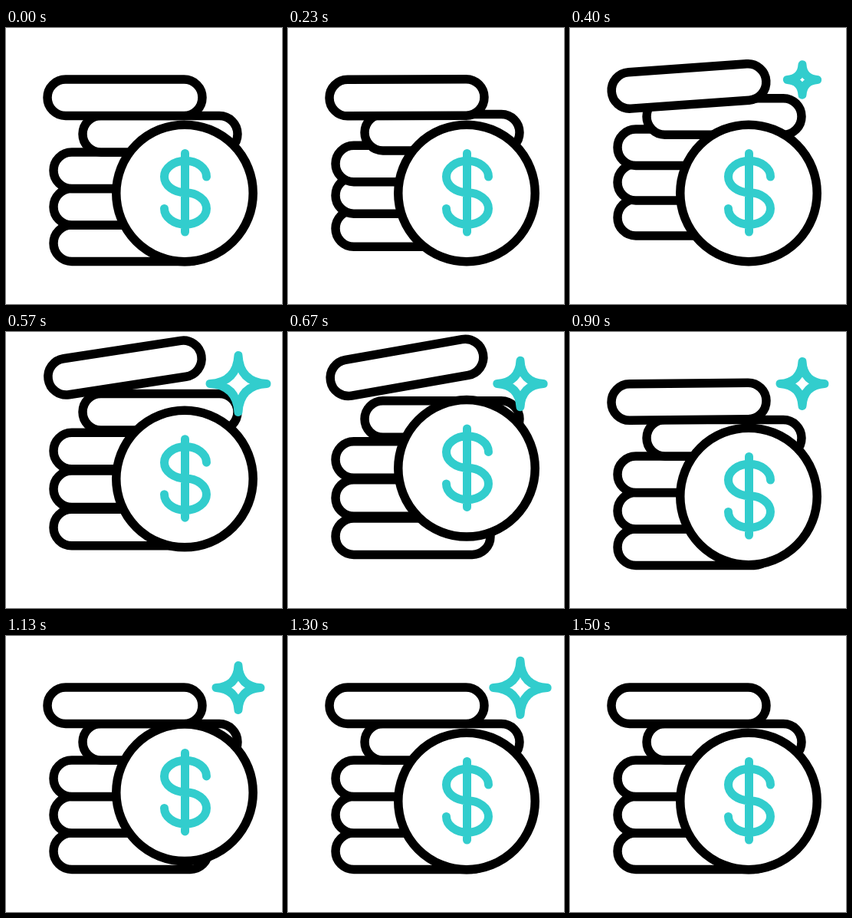
An HTML page with a canvas that plays this animation: 360 by 360 pixels, repeating every 2 s.

```html
<!DOCTYPE html>
<html lang="en">
<head>
<meta charset="utf-8">
<title>Coin stack</title>
<style>
  html, body { margin: 0; width: 100%; height: 100%; overflow: hidden; background: #fff; }
  canvas { display: block; width: 360px; height: 360px; }
</style>
</head>
<body>
<canvas id="stage" width="360" height="360"></canvas>
<script>
const ctx = document.getElementById('stage').getContext('2d');
const LOOP = 2000;
const MOVE_END = 1500;
const STEP = 1000 / 30;
const TEAL = '#32cdcd';
const LINE = 11.5;

// Each track is a list of [time, value] stops, eased between neighbours.
const bars = [
  { x: 62, y: 257, lift: [[0, 0], [430, -34], [855, 0]] },
  { x: 62, y: 209.5, lift: [[40, 0], [462, -34], [868, 0]] },
  { x: 62, y: 162, lift: [[110, 0], [485, -34.5], [878, 0]] },
  { x: 100, y: 114.5, lift: [[181, 0], [540, -34.5], [900, 0]] },
  { x: 54, y: 67, lift: [[270, 0], [618, -47], [628, -47], [898, 0]],
    tilt: [[186, 0], [676, -10], [940, 0]] }
];
const coinLift = [[400, 0], [685, -38], [923, 0], [1090, -13.5], [1250, 0]];
const starSize = [[237, 0], [550, 37], [565, 37], [700, 29], [1150, 29], [1270, 37], [1495, 0]];

const dollar = new Path2D(
  'M233.5 163.5V266M261.5 194A27.5 20.75 0 1 0 234 214.75' +
  'A27.5 20.75 0 1 1 206.5 235.5');

function valueAt(track, t) {
  if (t <= track[0][0]) return track[0][1];
  for (let i = 1; i < track.length; i++) {
    const [t0, v0] = track[i - 1];
    const [t1, v1] = track[i];
    if (t < t1) {
      const p = (t - t0) / (t1 - t0);
      return v0 + (v1 - v0) * p * p * (3 - 2 * p);
    }
  }
  return track[track.length - 1][1];
}

function drawBar({ x, y, lift, tilt }, t) {
  const w = 202, h = 47.5;
  ctx.save();
  ctx.translate(x + w / 2, y + h / 2 + valueAt(lift, t));
  if (tilt) ctx.rotate(valueAt(tilt, t) * Math.PI / 180);
  ctx.beginPath();
  ctx.roundRect(-w / 2, -h / 2, w, h, h / 2);
  ctx.fill();
  ctx.stroke();
  ctx.restore();
}

function drawCoin(t) {
  ctx.save();
  ctx.translate(0, valueAt(coinLift, t));
  ctx.beginPath();
  ctx.arc(233, 215.4, 89.25, 0, Math.PI * 2);
  ctx.fill();
  ctx.stroke();
  ctx.strokeStyle = TEAL;
  ctx.lineWidth = 11;
  ctx.stroke(dollar);
  ctx.restore();
}

function drawStar(t) {
  const r = valueAt(starSize, t);
  if (r <= 0) return;
  const c = r * 0.05;
  ctx.save();
  ctx.translate(303, 67.5);
  ctx.strokeStyle = TEAL;
  ctx.lineWidth = 11;
  ctx.beginPath();
  ctx.moveTo(0, -r);
  ctx.quadraticCurveTo(c, -c, r, 0);
  ctx.quadraticCurveTo(c, c, 0, r);
  ctx.quadraticCurveTo(-c, c, -r, 0);
  ctx.quadraticCurveTo(-c, -c, 0, -r);
  ctx.closePath();
  ctx.fill();
  ctx.stroke();
  ctx.restore();
}

function draw(t) {
  ctx.fillStyle = '#fff';
  ctx.fillRect(0, 0, 360, 360);
  ctx.strokeStyle = '#000';
  ctx.lineWidth = LINE;
  ctx.lineCap = ctx.lineJoin = 'round';
  for (const bar of bars) drawBar(bar, t);
  drawCoin(t);
  drawStar(t);
}

// Hold each pose for one thirtieth of a second, on a 10 ms clock.
function poseTime(ms) {
  const tick = Math.floor(ms / 10) * 10;
  return Math.min(MOVE_END, Math.floor((tick + 3.4) / STEP) * STEP);
}

let start;
function loop(now) {
  start ??= now;
  draw(poseTime(Math.max(0, now - start) % LOOP));
  requestAnimationFrame(loop);
}
draw(0);
requestAnimationFrame(loop);
</script>
</body>
</html>
```
